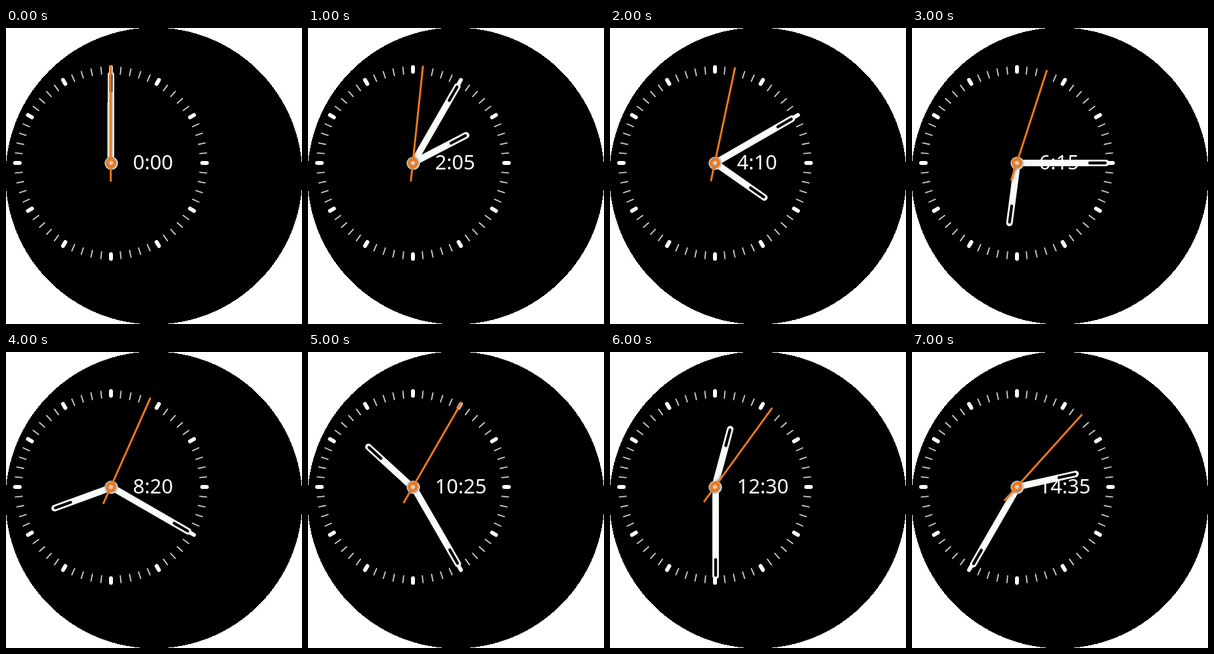
Animation, 454 px wide and 454 px high, one loop 8000 ms. Source, as an HTML page:

```html
<!DOCTYPE html>
<html>
<head>
<meta charset="utf-8">
<style>
  html, body { margin: 0; width: 100%; height: 100%; overflow: hidden; background: #fff; }
  svg { display: block; }
  text { font: 31px "Noto Sans", "Open Sans", sans-serif; fill: #fff; }
  line { stroke-linecap: round; }
  .hand { stroke: #f8fcf8; stroke-width: 10; }
  .slot { stroke: #000; stroke-width: 4.4; }
  .sweep { stroke: #f07818; stroke-width: 3; }
  .raised { filter: drop-shadow(0 0 2.5px rgba(0, 0, 0, .6)); }
</style>
</head>
<body>
<svg width="454" height="454" viewBox="0 0 454 454">
  <circle cx="227" cy="227" r="227.7" shape-rendering="crispEdges"/>
  <g id="ticks" transform="translate(161 207)"></g>
  <text id="label" x="194.7" y="217"></text>
  <g transform="translate(161 207.5)">
    <g id="hour">
      <line class="hand" x1="-.5" x2="-.5" y2="-92.2"/>
      <line class="slot" x1="-.5" x2="-.5" y1="-66" y2="-91"/>
    </g>
  </g>
  <g transform="translate(161.5 207.5)">
    <g id="minute">
      <line class="hand" x1="-.5" x2="-.5" y2="-136"/>
      <line class="slot" x1="-.5" x2="-.5" y1="-111" y2="-135"/>
    </g>
    <circle r="10.3" fill="#e4e6e4"/>
  </g>
  <g class="raised" transform="translate(161 207)">
    <g id="second">
      <line class="sweep" x1="-.3" x2="-.3" y1="27.5" y2="-148.5"/>
    </g>
    <circle r="5.5" fill="#d0d0d0" stroke="#f07818" stroke-width="4.4"/>
  </g>
</svg>
<script>
const $ = id => document.getElementById(id);
const turn = (id, deg) => $(id).setAttribute('transform', `rotate(${deg})`);

let marks = '';
for (let i = 0; i < 60; i++) {
  const major = i % 5 === 0;
  const [from, to, width, color] = major ? [140, 147, 6, '#fff'] : [137, 147.5, 1.9, '#c8c8c8'];
  marks += `<line y1="${-from}" y2="${-to}" stroke="${color}" stroke-width="${width}" transform="rotate(${i * 6})"/>`;
}
$('ticks').innerHTML = marks;

const start = performance.now();
function draw() {
  // Each tick advances the clock by 2 h 5 min and 1 s.
  const step = Math.floor((performance.now() - start) / 1000) % 8;
  const minutes = step * 125;
  turn('hour', minutes / 2);
  turn('minute', minutes * 6);
  turn('second', step * 6);
  $('label').textContent = Math.floor(minutes / 60) + ':' + String(minutes % 60).padStart(2, '0');
  requestAnimationFrame(draw);
}
draw();
</script>
</body>
</html>
```
